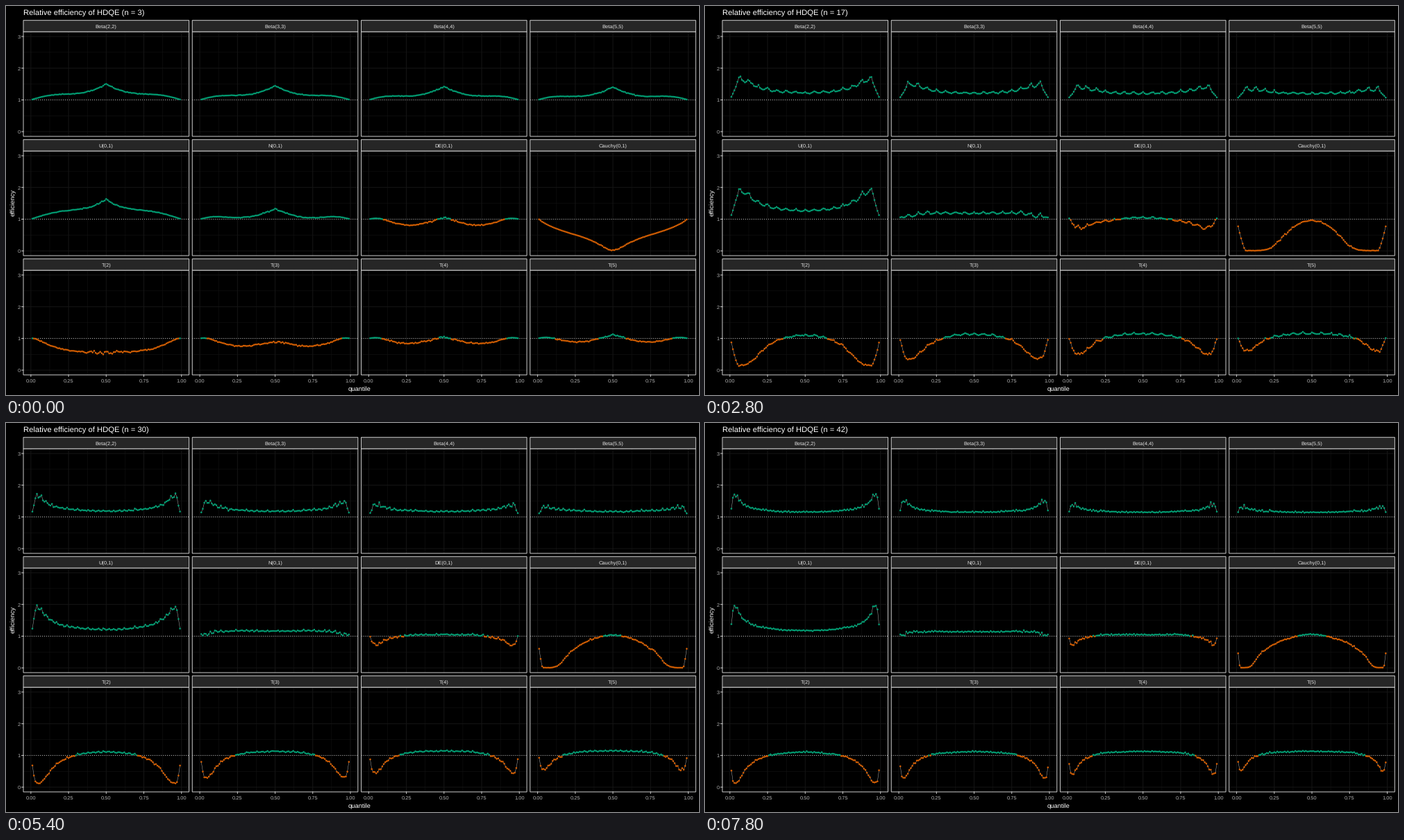
A matplotlib script for the animation above (8000 ms loop, 998x561 px).

```python
import math

import matplotlib.pyplot as plt
import numpy as np
from matplotlib.animation import FuncAnimation
from matplotlib.patches import Rectangle

W, H, DPI = 998, 561, 100
PT = 72 / DPI  # points per pixel
FRAMES, INTERVAL = 40, 200
FIRST_N = 3
REPS = 200  # samples per simulated group

GREEN, ORANGE = "#009E73", "#D55E00"
BORDER, STRIP, GRID = "#CCCCCC", "#262626", "#151515"
PROBS = np.arange(1, 100) / 100

plt.rcParams["font.family"] = "Liberation Sans"
plt.rcParams["text.hinting"] = "none"
plt.rcParams["path.snap"] = False


# ---------- distributions (quantile functions) ----------

def tabulated(x, pdf):
    """Quantile function from a density given on a grid."""
    steps = (pdf[1:] + pdf[:-1]) / 2 * np.diff(x)
    cdf = np.concatenate([[0], np.cumsum(steps)])
    cdf /= cdf[-1]
    return lambda u: np.interp(u, cdf, x)


def beta(k):
    x = np.linspace(0, 1, 1501)
    return tabulated(x, (x * (1 - x)) ** (k - 1))


def student(v):
    x = np.sinh(np.linspace(-7, 7, 1501))
    return tabulated(x, (1 + x * x / v) ** (-(v + 1) / 2))


def normal():
    x = np.linspace(-6, 6, 1501)
    return tabulated(x, np.exp(-x * x / 2))


def laplace(u):
    return -np.sign(u - 0.5) * np.log(2 * np.minimum(u, 1 - u))


DISTS = [
    ("Beta(2,2)", beta(2)),
    ("Beta(3,3)", beta(3)),
    ("Beta(4,4)", beta(4)),
    ("Beta(5,5)", beta(5)),
    ("U(0,1)", lambda u: u),
    ("N(0,1)", normal()),
    ("DE(0,1)", laplace),
    ("Cauchy(0,1)", lambda u: np.tan(np.pi * (u - 0.5))),
    ("T(2)", lambda u: (2 * u - 1) / np.sqrt(2 * u * (1 - u))),
    ("T(3)", student(3)),
    ("T(4)", student(4)),
    ("T(5)", student(5)),
]


# ---------- quantile estimators as weights of order statistics ----------

lgamma = np.vectorize(math.lgamma)


def inc_beta(x, a, b):
    """Regularized incomplete beta function by power series."""
    x, a, b = np.broadcast_arrays(x, a, b)
    flip = x > 0.5
    x, a, b = np.where(flip, 1 - x, x), np.where(flip, b, a), np.where(flip, a, b)
    term = np.ones_like(x)
    total = np.ones_like(x)
    for k in range(200):
        term = term * x * (a + b + k) / (a + 1 + k)
        total += term
    log_front = (a * np.log(x) + b * np.log1p(-x) - np.log(a)
                 + lgamma(a + b) - lgamma(a) - lgamma(b))
    value = np.exp(log_front) * total
    return np.where(flip, 1 - value, value)


def smooth_weights(n):
    p = PROBS[:, None]
    inner = inc_beta(np.arange(1, n)[None, :] / n, (n + 1) * p, (n + 1) * (1 - p))
    return np.diff(np.pad(inner, ((0, 0), (1, 1)), constant_values=(0, 1)), axis=1)


def linear_weights(n):
    pos = (n - 1) * PROBS[:, None]
    return np.maximum(0, 1 - np.abs(np.arange(n)[None, :] - pos))


def mse(w, second, mean, true):
    quad = ((w @ second) * w).sum(axis=2)
    return quad - 2 * true * (mean @ w.T) + true ** 2


def efficiency(n):
    """Efficiency at every probability, one row per distribution."""
    rng = np.random.default_rng(n)
    groups = 45 + 500 // n
    gaps = rng.standard_exponential((groups, REPS, n + 1)).cumsum(axis=2)
    u = gaps[:, :, :n] / gaps[:, :, n:]
    smooth, linear = smooth_weights(n), linear_weights(n)
    rows = []
    for _, quantile in DISTS:
        x = quantile(u)
        second = x.transpose(0, 2, 1) @ x / REPS
        mean = x.mean(axis=1)
        true = quantile(PROBS)
        ratio = mse(linear, second, mean, true) / mse(smooth, second, mean, true)
        ratio = np.concatenate([ratio, ratio[:, ::-1]])
        low, mid, high = np.percentile(ratio, [25, 50, 75], axis=0)
        noise = 0.11 * (high - low) * rng.standard_normal(len(PROBS))
        rows.append(np.maximum(mid + noise, 0))
    return np.array(rows)


CURVES = [efficiency(FIRST_N + i) for i in range(FRAMES)]


# ---------- static stage, in pixel coordinates ----------

PANEL_W, PITCH_X, PITCH_Y = 238.57, 243.25, 172
LEFT, STRIP_TOP, TOP, BOTTOM = 25.0, 20.7, 37.1, 188.0


def to_x(col, v):
    return LEFT + PITCH_X * col + PANEL_W * (v + 0.05) / 1.1


def to_y(row, v):
    return BOTTOM + PITCH_Y * row - (BOTTOM - TOP) * (v + 0.15) / 3.3


fig = plt.figure(figsize=(W / DPI, H / DPI), dpi=DPI, facecolor="black")
ax = fig.add_axes([0, 0, 1, 1])
ax.set_xlim(0, W)
ax.set_ylim(H, 0)
ax.axis("off")


def line(xs, ys, color, width=1.0, z=1, **kw):
    return ax.plot(xs, ys, color=color, lw=width * PT, zorder=z, **kw)[0]


def label(x, y, s, px, color="white", ha="center", va="baseline", **kw):
    return ax.text(x, y, s, fontsize=px * PT, color=color, ha=ha, va=va, **kw)


def box(x, y, w, h, fill, z):
    ax.add_patch(Rectangle((x, y), w, h, facecolor=fill, edgecolor=BORDER,
                           lw=PT, zorder=z, snap=False))


def draw_panel(col, row, name):
    x0, dy = LEFT + PITCH_X * col, PITCH_Y * row
    x1, y0, y1 = x0 + PANEL_W, TOP + dy, BOTTOM + dy
    for k in range(9):
        x = to_x(col, k / 8)
        line([x, x], [y0, y1], GRID, 0.52 if k % 2 else 1.04)
    for k in range(7):
        y = to_y(row, k / 2)
        line([x0, x1], [y, y], GRID, 0.52 if k % 2 else 1.04)
    y = to_y(row, 1)
    line([x0, x1], [y, y], "#B0B0B0", 1, 2, dashes=(1, 2), dash_capstyle="butt")
    box(x0, y0, PANEL_W, y1 - y0, "none", 6)
    box(x0, STRIP_TOP + dy, PANEL_W, TOP - STRIP_TOP, STRIP, 6)
    label((x0 + x1) / 2, 32 + dy, name, 7.5, "#E5E5E5", zorder=7)
    if col == 0:
        for v in range(4):
            y = to_y(row, v)
            line([x0 - 2.4, x0], [y, y], BORDER)
            label(21, y + 2.9, str(v), 7.5, "#B3B3B3", ha="right")
    if row == 2:
        for k in range(5):
            x = to_x(col, k / 4)
            line([x, x], [y1, y1 + 2.4], BORDER)
            label(x, 543, f"{k / 4:.2f}", 7.5, "#B3B3B3")


for i, (name, _) in enumerate(DISTS):
    draw_panel(i % 4, i // 4, name)

label(509, 554.7, "quantile", 9.36)
label(10, 283.5, "efficiency", 9.36, va="center", rotation=90)
title = label(25, 13.7, "", 11.23, ha="left")

# ---------- moving parts ----------

COLS, ROWS = np.arange(12)[:, None] % 4, np.arange(12)[:, None] // 4
XS = to_x(COLS, PROBS[None, :])
curve = line([], [], "#A8A8A8", 0.52, 3)
dots = ax.scatter(XS.ravel(), XS.ravel(), s=(2.6 * PT) ** 2, lw=0, zorder=4)


def with_gaps(a):
    return np.pad(a, ((0, 0), (0, 1)), constant_values=np.nan).ravel()


def update(i):
    eff = CURVES[i]
    ys = to_y(ROWS, eff)
    curve.set_data(with_gaps(XS), with_gaps(ys))
    dots.set_offsets(np.column_stack([XS.ravel(), ys.ravel()]))
    dots.set_facecolor(np.where(eff.ravel() >= 1, GREEN, ORANGE))
    title.set_text(f"Relative efficiency of HDQE (n = {FIRST_N + i})")
    return curve, dots, title


anim = FuncAnimation(fig, update, frames=FRAMES, interval=INTERVAL,
                     init_func=lambda: update(0), repeat=True, repeat_delay=0)
plt.show()
```
